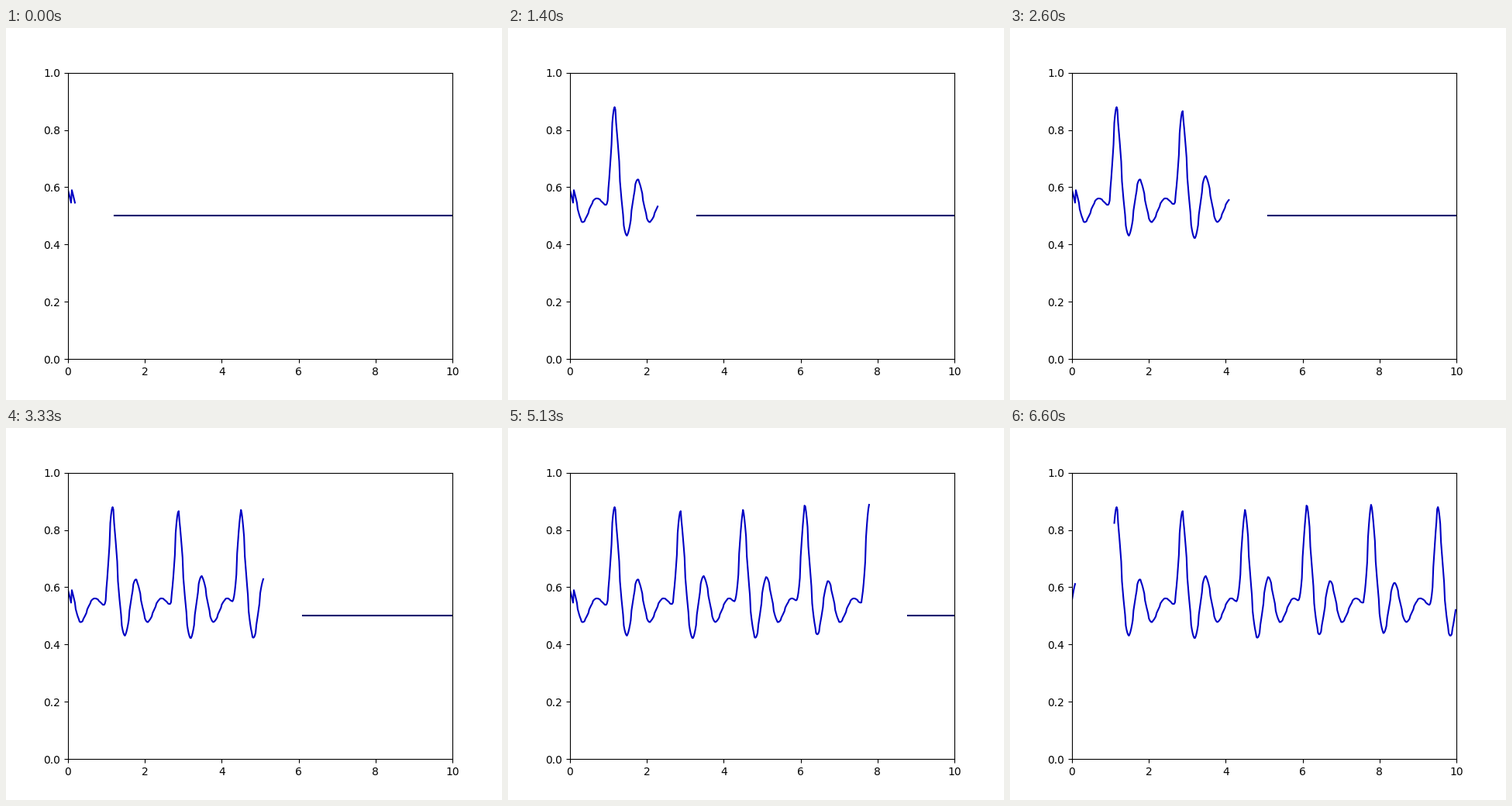
A matplotlib script that plays this animation: 640x480 px, repeating every 6670 ms.

```python
import numpy as np
import matplotlib.pyplot as plt
from matplotlib.animation import FuncAnimation

FPS, FRAMES = 15, 100
SIZE, CHUNK, GAP = 500, 5, 50
DT = 0.02
PERIOD = 1.673


def swing(n, lag):
    """Slow breathing rhythm that repeats every five beats."""
    return np.cos(2 * np.pi * (n - lag) / 5)


def beat(n):
    """Time of the n-th peak."""
    return 1.142 + PERIOD * n + .057 * swing(n, 1)


def turning_points():
    """Rows of time, level and skew of the eased curve that follows."""
    points = []
    for n in range(-1, 7):
        t, after = beat(n), beat(n + 1)
        w = swing(n, 1.3)
        points += [
            (t, .879 - .014 * w, .77),                                    # peak
            (t + .320, .430 - .010 * w, .95),                             # dip
            (t + .603, .628 + .012 * w, .93),                             # bump
            (t + .910, .478, .90),                                        # trough
            (t + 1.267, .561, 1.2),                                       # shoulder
            (after - .226, .546 - .12 * (after - t - PERIOD), 1.15),      # notch
        ]
    return np.array(points).T


def pulse(t):
    """Level of the smooth pulse at time t."""
    times, levels, skew = turning_points()
    i = np.searchsorted(times, t, side="right") - 1
    s = (t - times[i]) / (times[i + 1] - times[i])
    ease = (1 - np.cos(np.pi * s ** skew[i])) / 2
    return levels[i] + (levels[i + 1] - levels[i]) * ease


def record():
    """Samples come in short bursts that leave a small jump between chunks."""
    chunk, k = np.divmod(np.arange(SIZE + CHUNK), CHUNK)
    chunk = np.maximum(chunk, 1)  # the first chunk is written twice
    return pulse((chunk * CHUNK + 2 + (k - 2) / 1.2) * DT)


x = np.arange(SIZE) * DT
samples = record()

fig, ax = plt.subplots(figsize=(6.4, 4.8), dpi=100)
ax.set_xlim(0, 10)
ax.set_ylim(0, 1)
idle, = ax.plot([], [], color="#00006e", lw=1.5)
trace, = ax.plot([], [], color="#0000c4", lw=1.5)


def update(n):
    head = CHUNK * (n + 2)
    y = np.full(SIZE, np.nan)
    written = np.arange(head)
    y[written % SIZE] = samples[written]
    y[np.arange(head, head + GAP) % SIZE] = np.nan
    trace.set_data(x, y)

    rest = x[head + GAP:]
    idle.set_data(rest, np.full(len(rest), .5))
    return trace, idle


anim = FuncAnimation(fig, update, frames=FRAMES, interval=1000 / FPS,
                     repeat=True, repeat_delay=0)
plt.show()
```
